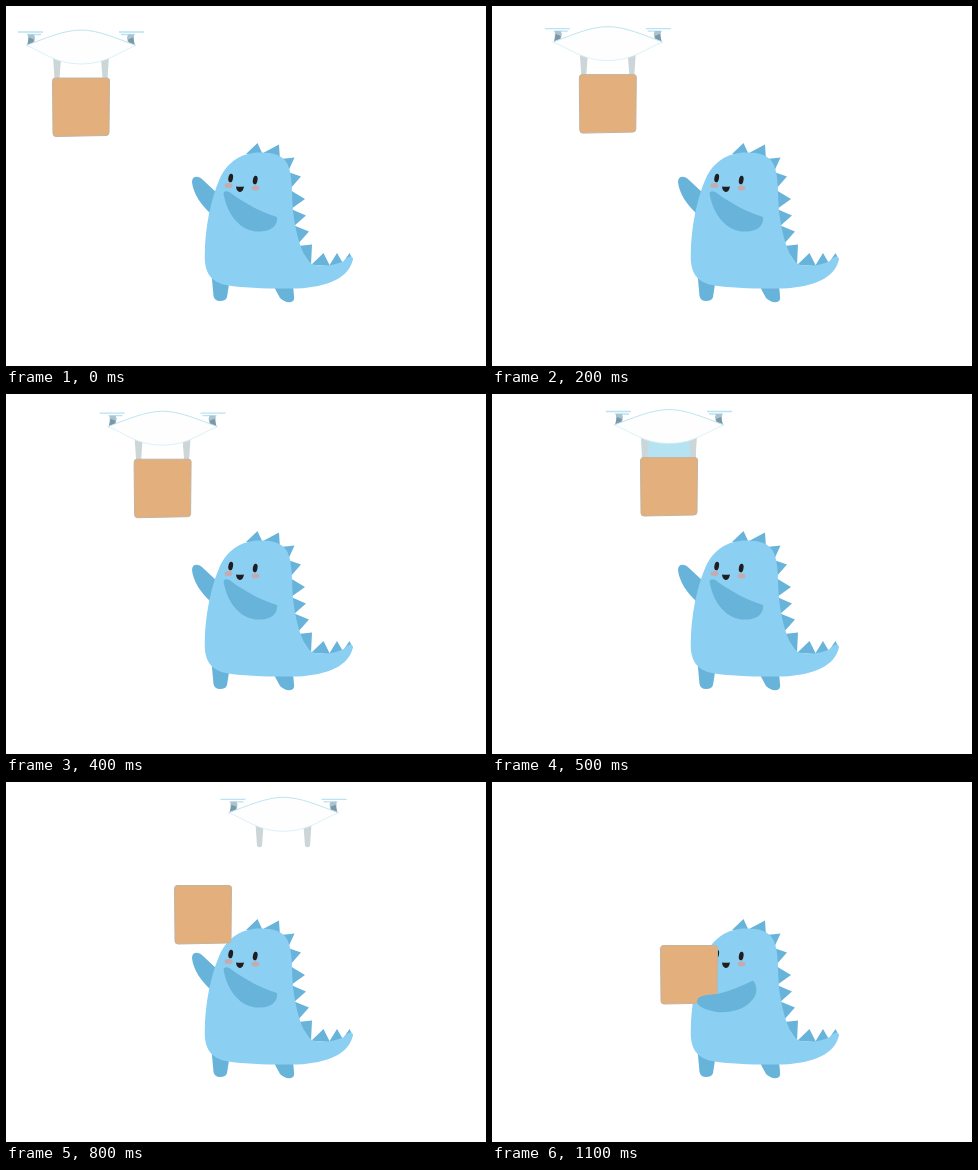
Recreate the animation shown at these times as an HTML page. Size 480 px wide and 360 px high, loop 1600 ms.

```html
<!DOCTYPE html>
<html lang="en">
<head>
<meta charset="utf-8">
<title>Drone delivery</title>
<style>
html, body { margin: 0; width: 100%; height: 100%; overflow: hidden; background: #fff; }
svg { display: block; width: 100vw; height: 100vh; }
.dark { fill: #68b3da; }
.light { fill: #8bcff2; }
</style>
</head>
<body>
<svg viewBox="0 0 480 360">
  <defs>
    <g id="rotor">
      <path d="M-63 2.5H-38M-54 5H-40" stroke="#b9e2f3" stroke-width="1.3"/>
      <path d="M-53 5h6l1 3-1 6-6 2z" fill="#a9c3cf"/>
      <path d="M-52 8l5 2-1 4-6 2z" fill="#7b98a8"/>
    </g>
    <path id="leg" d="M-28 27L-20 29L-21.500 49Q-24 52-26.500 49Z" fill="#ccd6d8"/>
  </defs>

  <g id="drone">
    <path id="glow" d="M-28 27H27L27 51H-27Z" fill="#b5e3f2"/>
    <use href="#leg"/><use href="#leg" transform="scale(-1 1)"/>
    <use href="#rotor"/><use href="#rotor" transform="scale(-1 1)"/>
    <path d="M-55 16C-36 9-17 .5 0 .5S36 9 55 16C38 22 26 34.500 0 34.500S-38 22-55 16Z" fill="#fefefe"/>
    <path d="M-55 16C-36 9-17 .5 0 .5S36 9 55 16" fill="none" stroke="#bfe4f1"/>
    <path d="M-55 16C-38 22-26 34.500 0 34.500S38 22 55 16" fill="none" stroke="#d3edf5" stroke-width=".8"/>
  </g>

  <path class="dark" d="M204 207C195 199 187 187 186 176C186 170 192 169 197 174L212 188Z"/>
  <path class="dark" d="M205.500 268L207.500 290Q208.500 295 214 295Q220 295 221 291L224 272ZM267 279L274 292Q279 297 285 296Q289 295 288 290L287 279Z"/>
  <path class="dark" d="M240 148L251.500 137L257 149ZM257 147L273 138.500L274 154ZM275 153L288.500 151.500L281 168ZM282 166L295 170.500L284 183ZM284 184L299 193L285 203ZM285 203L300 209.500L287 221ZM287 219L303 225.500L291 239ZM292 240L306 238.500L305 259ZM305 259L317.500 247L324 260ZM323 260L331 247L338 259ZM336 258L343.500 247L347 254Z"/>
  <path class="light" d="M255 146.500C237 146 222 155 214 172C205 192 199 222 198.800 248C198 268 206 276 220 279C236 282 269 283 291 282.500C322 281 343 272 347 253C346 249 342 250 338 255C328 260 314 261 306 258C296 251 290 229 287 205C285.500 187 287 170 281.500 158C277 149 267 146.500 255 146.500Z"/>
  <g fill="#c5abb0">
    <ellipse cx="222.500" cy="179.500" rx="4" ry="2.500"/>
    <ellipse cx="249.500" cy="182" rx="4" ry="2.500"/>
  </g>
  <g fill="#211c1e">
    <ellipse cx="224.700" cy="172" rx="2.300" ry="4.400" transform="rotate(10 224.700 172)"/>
    <ellipse cx="249.200" cy="174" rx="2.300" ry="4.400" transform="rotate(10 249.200 174)"/>
    <path d="M230 180.500Q234 181 238 180.500Q237 186 233.500 186Q230.500 185 230 180.500Z"/>
  </g>

  <path id="box" d="M3 .5H55Q57.500 .5 57.500 3L57 55Q57 58 54 58L4 59Q1 59 1 56L.5 4Q.5 .5 3 .5Z" fill="#e2af7d" stroke="#c3b4a0"/>
  <path id="arm" class="dark"/>
</svg>
<script>
const REACH = 'M218 190C216 184 222 184 226 188C240 198 255 206 271 211C272 219 266 225 255 225.5C236 227 222 210 218 190Z';
const HOLD = 'M205 219C206 213 215 213 225 212C238 209 250 204 261 198.5C265 203 266 211 261 217C253 228 238 231 225 230C214 228 205 225 205 219Z';
const [drone, glow, box, arm] = ['drone', 'glow', 'box', 'arm'].map(id => document.getElementById(id));

const place = (el, x, y) => el.setAttribute('transform', `translate(${x} ${y})`);
const show = (el, on) => el.setAttribute('visibility', on ? 'visible' : 'hidden');

function draw(now) {
  // The motion advances in steps of 100 ms.
  const step = Math.floor(now % 1600 / 100);

  if (step < 7) {
    const x = 75 + 20.4 * step, y = 23.5 - 1.7 * step;
    place(drone, x, y);
    place(box, x - 29, y + 48);
  } else {
    const leave = step - 7;
    place(drone, 221 + 56.5 * leave, 9.5 + 5.3 * leave);
    place(box, 168, 73 + 30 * Math.min(leave, 3));
  }
  show(drone, step < 10);
  show(glow, step === 5);
  arm.setAttribute('d', step < 11 ? REACH : HOLD);
  requestAnimationFrame(draw);
}
draw(performance.now());
</script>
</body>
</html>
```
